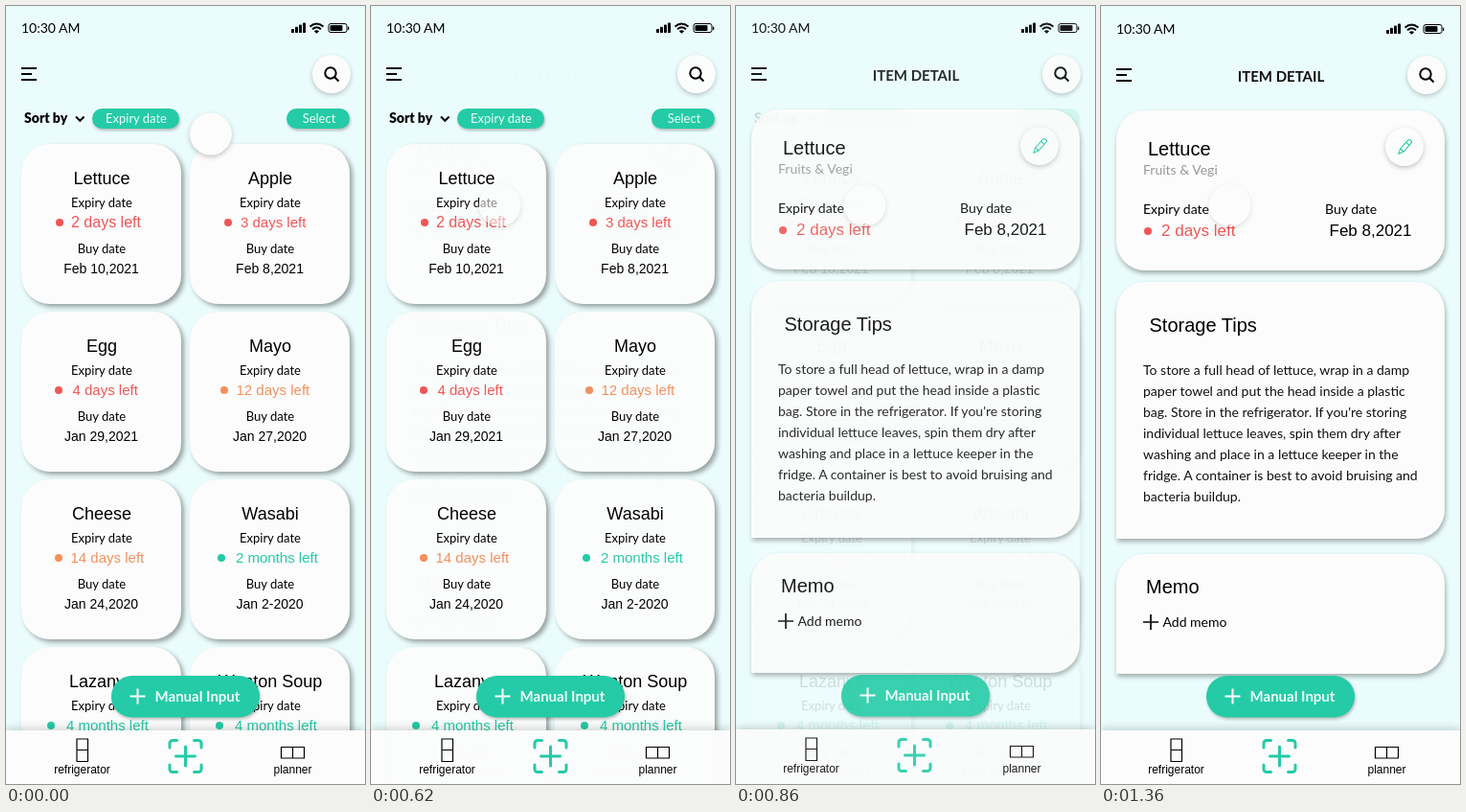
Animation, 375 px wide and 812 px high, one loop 1380 ms. Source, as an HTML page:

```html
<!DOCTYPE html>
<html lang="en">
<head>
<meta charset="utf-8">
<title>Food list</title>
<style>
  html, body { margin: 0; width: 100%; height: 100%; overflow: hidden; background: #ebfcfc; }
  svg { display: block; }
  text { font-family: Lato, sans-serif; white-space: pre; }
  .arial { font-family: "Liberation Sans", Arial, sans-serif; }
  .mid { text-anchor: middle; }
  .card { fill: #fcfcfc; filter: drop-shadow(3px 3px 2.5px rgba(0,0,0,.36)); }
  .sheet { fill: #fcfcfc; filter: drop-shadow(1px 3px 2.5px rgba(0,0,0,.32)); }
  .round { fill: #fcfcfc; filter: drop-shadow(0 2px 2.5px rgba(0,0,0,.22)); }
  .pill { fill: #24cba6; filter: drop-shadow(1px 2px 1.5px rgba(0,0,0,.25)); }
  .nav { fill: #fcfcfc; filter: drop-shadow(0 -2px 4px rgba(0,0,0,.18)); }
  .line { fill: none; stroke: #000; stroke-width: 2; }
</style>
</head>
<body>
<svg width="375" height="812" viewBox="0 0 375 812">
  <g id="list"></g>
  <g id="detail"></g>
  <g id="cursor"><circle class="round" r="22"/></g>
</svg>
<script>
const GREEN = '#24cba6', RED = '#f05555', ORANGE = '#f2915c';

const text = (s, x, y, size, cls = '', fill = '#000', weight = 400) =>
  `<text class="${cls}" x="${x}" y="${y}" font-size="${size}" fill="${fill}" font-weight="${weight}">${s}</text>`;
const rect = (cls, x, y, w, h, r = 0) =>
  `<rect class="${cls}" x="${x}" y="${y}" width="${w}" height="${h}" rx="${r}"/>`;
const dot = (x, y, fill) => `<circle cx="${x}" cy="${y}" r="4" fill="${fill}"/>`;
const line = (d, stroke = '#000', width = 2, more = '') =>
  `<path class="line" d="${d}" style="stroke:${stroke};stroke-width:${width}" ${more}/>`;
const plus = (x, y, r, stroke, width, more) =>
  line(`M${x - r} ${y}h${2 * r}M${x} ${y - r}v${2 * r}`, stroke, width, more);
const group = (s, x = 0, y = 0) => `<g transform="translate(${x} ${y})">${s}</g>`;

const header = dy => group(
  text('10:30 AM', 16, 28, 14) +
  [0, 1, 2, 3].map(i => rect('', 298 + i * 4, 24 - i * 2.2, 3, 4 + i * 2.2, .7)).join('') +
  line('M317.5 21.5q7-6 14 0M320 24.2q4.5-4 9 0', '#000', 2) +
  '<path d="M321.8 26.2q2.7-2 5.4 0l-2.7 2.6z"/>' +
  line('M339 18.5h15a2 2 0 0 1 2 2v5a2 2 0 0 1-2 2h-15a2 2 0 0 1-2-2v-5a2 2 0 0 1 2-2z', '#000', 1) +
  rect('', 338.5, 20, 13, 6, 1) + rect('', 357, 21.5, 1.3, 3.5, .6) +
  line('M16 65h16M16 71h11M16 77h16') +
  '<circle class="round" cx="340" cy="71" r="20"/>' +
  '<circle class="line" cx="339" cy="70" r="5.7"/>' + line('M343 74l4.5 4.5'), 0, dy);

const corners = [0, 90, 180, 270].map(a =>
  line('M-16.5 -9v-4.5a3 3 0 0 1 3-3h4.5', GREEN, 3, `stroke-linecap="round" transform="rotate(${a})"`)).join('');

const nav = dx =>
  rect('nav', 0, 756, 375, 70) +
  group(
    line('M74 765h11.5v23.5h-11.5zM74 776.5h11.5', '#000', 1.2) +
    text('refrigerator', 79.5, 801, 12, 'arial mid') +
    group(corners + plus(0, 0, 10, GREEN, 3, 'stroke-linecap="round"'), 187.5, 783) +
    line('M287.5 773.5h24v11.5h-24zM299.5 773.5v11.5', '#000', 1.2) +
    text('planner', 299.5, 801, 12, 'arial mid'), dx);

const addButton = group(
  rect('pill', 110, 699, 155, 43.5, 21.7) +
  plus(137.5, 720.5, 8, '#fff', 2) +
  text('Manual Input', 200, 725.5, 15, 'mid', '#effffa', 700));

// name, time left, dot x, label x, colour, buy date, label size
const foods = [
  ['Lettuce', '2 days', 56, 68, RED, 'Feb 10,2021', 16],
  ['Apple', '3 days', 232, 245, RED, 'Feb 8,2021'],
  ['Egg', '4 days', 55, 69.5, RED, 'Jan 29,2021'],
  ['Mayo', '12 days', 228, 240.5, ORANGE, 'Jan 27,2020'],
  ['Cheese', '14 days', 55, 67.5, ORANGE, 'Jan 24,2020'],
  ['Wasabi', '2 months', 225, 240, GREEN, 'Jan 2-2020'],
  ['Lazanya', '4 months', 47, 63, GREEN, 'Dec 20,2020'],
  ['Wonton Soup', '4 months', 223, 239, GREEN, 'Dec 22,2020'],
];
const foodCard = ([name, left, dotX, leftX, color, bought, size = 15], i) => {
  const x = 16 + i % 2 * 176, mid = x + 84;
  return group(
    rect('card', x, 144, 167, 167, 30) +
    text(name, mid, 186, 18, 'arial mid') +
    text('Expiry date', mid, 210, 13, 'mid') +
    dot(dotX, 226, color) + text(left + ' left', leftX, 231, size, 'arial', color) +
    text('Buy date', mid, 258, 13, 'mid') +
    text(bought, mid - .5, 279, 14, 'arial mid'), 0, (i >> 1) * 175);
};

const sheet = (y, h, r) =>
  `<path class="sheet" d="M46 ${y}H329a30 30 0 0 1 30 30V${y + h - 30}a30 30 0 0 1-30 30H${16 + r}` +
  `a${r} ${r} 0 0 1-${r}-${r}V${y + 30}a30 30 0 0 1 30-30z"/>`;

const tips = [
  'To store a full head of lettuce, wrap in a damp',
  'paper towel and put the head inside a plastic',
  "bag. Store in the refrigerator. If you're storing",
  'individual lettuce leaves, spin them dry after',
  'washing and place in a lettuce keeper in the',
  'fridge. A container is best to avoid bruising and',
  'bacteria buildup.',
];

const list = document.getElementById('list');
const detail = document.getElementById('detail');
const cursor = document.getElementById('cursor');

list.innerHTML =
  foods.map(foodCard).join('') + header(0) +
  text('Sort by', 19, 122, 14, '', '#000', 900) + line('M73 115.5l4.3 4.3l4.3-4.3') +
  group(rect('pill', 90, 107, 91, 21, 10.5) + text('Expiry date', 136, 122, 13, 'mid', '#effffa')) +
  group(rect('pill', 293, 107, 66, 21, 10.5) + text('Select', 327, 122, 13, 'mid', '#effffa')) +
  nav(0) + addButton;

detail.innerHTML =
  header(1) + text('ITEM DETAIL', 188, 78.5, 15, 'mid', '#111', 700) +
  group(
    sheet(109, 167, 30) +
    text('Lettuce', 49, 156, 20, 'arial') +
    text('Fruits &amp; Vegi', 44, 176, 14, '', '#999') +
    text('Expiry date', 44, 217, 14) + text('Buy date', 234, 217, 14) +
    dot(49, 235, RED) + text('2 days left', 63, 240, 17, 'arial', RED) +
    text('Feb 8,2021', 238.5, 240, 17, 'arial') +
    '<circle class="round" cx="317" cy="147" r="20"/>' +
    group(line('M-2.3 -7.5a2.3 2.3 0 0 1 4.6 0V4L0 9L-2.3 4zM-2.3 -5H2.3M-2.3 4H2.3', GREEN, 1.1,
      'transform="rotate(42)"'), 317, 147.5)) +
  group(
    sheet(288, 268, 0) + text('Storage Tips', 50.5, 340, 20, 'arial') +
    tips.map((s, i) => text(s, 44, 385 + i * 22, 14, '', '#111')).join('')) +
  group(
    sheet(572, 125, 0) + text('Memo', 47, 613, 20, 'arial') +
    plus(52, 643, 8, '#000', 1.7) + text('Add memo', 64.5, 648, 14)) +
  nav(-1) + addButton;

const progress = (t, start, length) => Math.min(1, Math.max(0, (t - start) / length));
// Parts fade one by one, so overlapping parts show through each other.
const fade = (parent, opacity) => {
  parent.style.display = opacity ? '' : 'none';
  for (const part of parent.children) part.style.opacity = opacity;
};

function draw() {
  const t = performance.now() % 1380;
  const move = 1 - (1 - progress(t, 0, 400)) ** 3;
  cursor.setAttribute('transform', `translate(${214.5 - 80 * move} ${133 + 75 * move})`);
  cursor.style.opacity = 1 - .45 * progress(t, 200, 200);

  const p = progress(t, 610, 320), shown = p * p * (3 - 2 * p);
  fade(list, 1 - shown);
  fade(detail, shown);
  detail.setAttribute('transform', `translate(0 ${p < 1 ? -1 : 0})`);
  requestAnimationFrame(draw);
}
draw();
</script>
</body>
</html>
```
